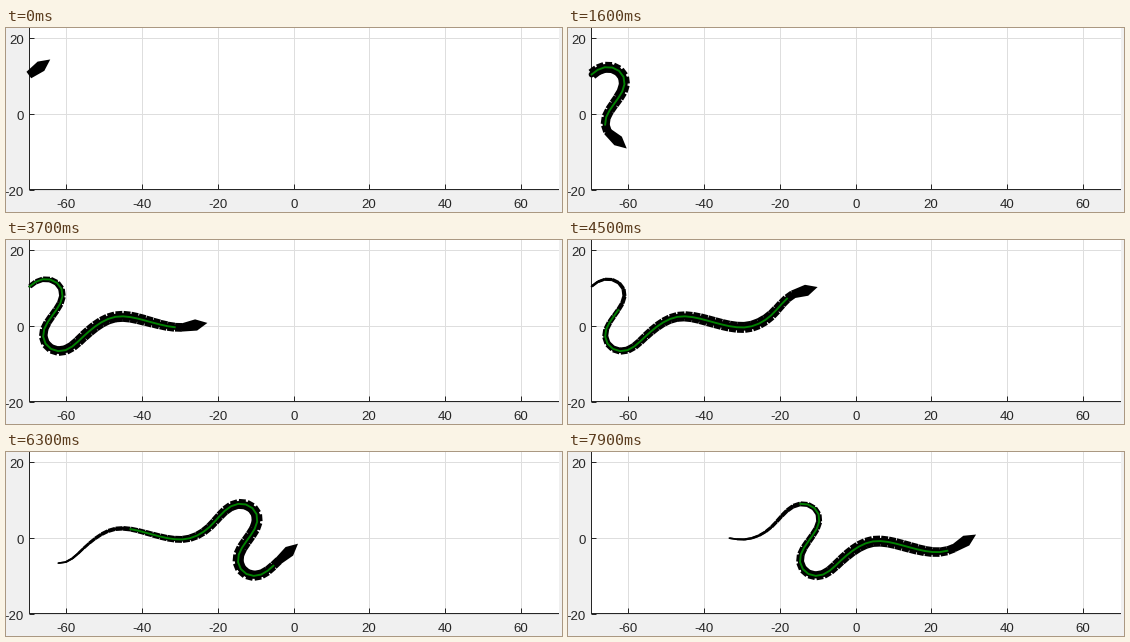
A matplotlib script for the animation above (8 s loop, 556x184 px).

```python
import numpy as np
import matplotlib.pyplot as plt
from matplotlib.animation import FuncAnimation
from matplotlib.collections import LineCollection
from matplotlib.patches import Polygon, Rectangle

W, H, DPI = 556, 184, 64
PT = 72 / DPI              # points per pixel
FRAMES, INTERVAL = 80, 100
HOLDS = np.array([1, 6, 9, 35])   # ticks on which the snake pauses
UNIT = 3.79                # pixels per axis unit
STEP = 2 * UNIT            # advance per move, also the segment length
SEGMENTS = 44
LEFT, RIGHT, BASE = 23, 552, 161
INK, GRID = "0.15", "0.87"

# One lap of the path: x, y and heading at its bends; each lap is shifted
BENDS = [(39.3, 38.5, 0), (56.1, 53.8, 90), (46, 74.8, 125),
         (36.6, 94.8, 90), (53, 110.7, 0), (79, 94, -42),
         (114.7, 75.8, 0), (144, 81.5, 15), (173.8, 87, 0), (206, 71.5, -47)]
LAP = 194.8 + 12.7j


def bend(p, q, v, w, n=40):
    """Near-circular Hermite arc from p to q with unit headings v and w."""
    u = np.linspace(0, 1, n, endpoint=False)
    turn = np.angle(w / v)
    pull = 2 * abs(q - p) / (1 + np.cos(turn / 2))
    return ((1 + 2 * u) * (1 - u) ** 2 * p + u ** 2 * (3 - 2 * u) * q
            + pull * u * (1 - u) * ((1 - u) * v - u * w))


def snake_path():
    keys = [(complex(x, y) + lap * LAP, np.exp(1j * np.radians(deg)))
            for lap in range(-1, 3) for x, y, deg in BENDS]
    z = np.concatenate([bend(p, q, v, w)
                        for (p, v), (q, w) in zip(keys, keys[1:])])
    return z[np.argmax(z.real >= LEFT):]


curve = snake_path()
arc = np.r_[0, np.cumsum(abs(np.diff(curve)))]


def at(s):
    return np.interp(s, arc, curve)


def xy(z):
    return np.stack([z.real, z.imag], axis=-1)


def body_width(d):
    """Width in pixels at distance d behind the neck."""
    return np.interp(d, [0, 45, 100, 335], [8.5, 11, 11, 1.4])


fig = plt.figure(figsize=(W / DPI, H / DPI), dpi=DPI, facecolor="#f0f0f0")
ax = fig.add_axes([0, 0, 1, 1])
ax.set_xlim(-0.5, W - 0.5)
ax.set_ylim(H - 0.5, -0.5)
ax.axis("off")


def rule(xs, ys, color=INK, z=2):
    ax.plot(xs, ys, color=color, lw=PT, snap=False,
            solid_capstyle="butt", zorder=z)


def label(x, y, text, ha):
    ax.text(x, y, text, ha=ha, va="baseline", color=INK,
            family="Liberation Sans", size=13.3 * PT)


ax.add_patch(Rectangle((LEFT - 0.5, -0.5), RIGHT - LEFT + 1, BASE + 0.5,
                       fc="white", ec="none", zorder=0))
for v in range(-60, 61, 20):
    x = round(287.6 + UNIT * v)
    rule([x, x], [-0.5, BASE], GRID, 1)
    rule([x, x], [BASE - 5, BASE])
    label(x - 0.5, 180, str(v), "center")
for v in (20, 0, -20):
    y = round(85.7 - UNIT * v)
    rule([LEFT, RIGHT + 0.5], [y, y], GRID, 1)
    rule([LEFT, LEFT + 5], [y, y])
    label(17.5, y + 5, str(v), "right")
rule([LEFT, LEFT], [-0.5, BASE + 0.5])
rule([LEFT - 0.5, RIGHT + 0.5], [BASE, BASE])

HEAD = np.array([-1 - 4j, 14 - 5.7j, 25.5, 14 + 5.7j, -1 + 4j])

plates = LineCollection([], colors="black", capstyle="butt", zorder=3)
core = LineCollection([], colors="black", capstyle="round", zorder=4)
for part in (plates, core):
    ax.add_collection(part, autolim=False)
spine, = ax.plot([], [], color="#008000", lw=1.9 * PT, zorder=5)
head = Polygon(xy(HEAD), closed=True, fc="black", ec="none", zorder=6)
ax.add_patch(head)


def draw(k):
    moves = k - np.count_nonzero(HOLDS <= k)
    neck = moves * STEP
    first = max(0, moves - SEGMENTS)
    joints = at(np.arange(first, moves + 1) * STEP)
    a, b = joints[:-1], joints[1:]
    dist = neck - (np.arange(first, moves) + 0.5) * STEP
    width = body_width(dist)

    trim = 0.04 * (b - a)
    plates.set_segments(list(xy(np.stack([a + trim, b - trim], axis=1))))
    plates.set_linewidths(width * PT)
    core.set_segments(list(xy(np.stack([a, b], axis=1))))
    core.set_linewidths(np.maximum(0.55 * width, np.minimum(width, 2)) * PT)

    green = a[dist < 247]
    spine.set_data(green.real, green.imag)

    p, q = at([neck + 1.5, neck + 7.5])
    head.set_xy(xy(at(neck) + HEAD * (q - p) / abs(q - p)))
    return plates, core, spine, head


anim = FuncAnimation(fig, draw, frames=FRAMES, interval=INTERVAL,
                     init_func=lambda: draw(0), repeat=True, repeat_delay=0)
plt.show()
```
